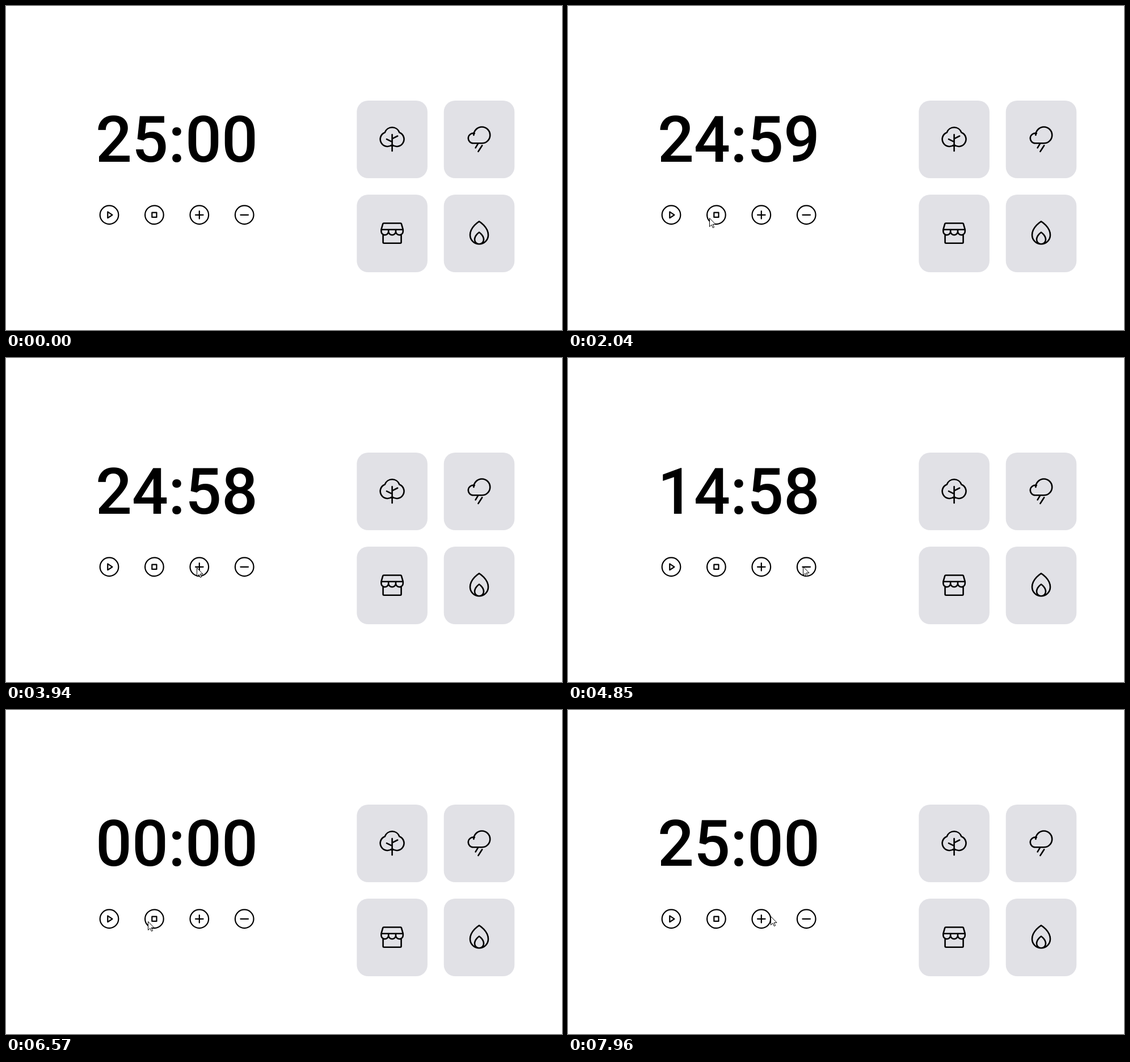
Recreate the animation shown at these times as an HTML page. Size 980 by 572 pixels, loop 8000 ms.

```html
<!DOCTYPE html>
<html lang="en">
<head>
<meta charset="utf-8">
<title>Focus timer</title>
<style>
  html, body { margin: 0; width: 100%; height: 100%; overflow: hidden; background: #fff; }
  svg { display: block; width: 980px; height: 572px; }
  text { font: 500 112.6px Roboto, sans-serif; text-anchor: middle; }
  .tile { fill: #e1e1e6; }
  .icon { fill: none; stroke: #000; stroke-width: 13; stroke-linecap: round; stroke-linejoin: round; }
</style>
</head>
<body>
<svg viewBox="0 0 980 572">
  <g id="scene"></g>
  <text id="clock" x="301" y="275.3"></text>
  <path id="cursor" d="M.5 .5V15.6L4 12.3L6.4 17.6L8.6 16.6L6.2 11.4H11Z" fill="#fff" stroke="#000"/>
</svg>
<script>
const LOOP = 8000;
const scene = document.getElementById('scene');
const clock = document.getElementById('clock');
const cursor = document.getElementById('cursor');

// Icons are drawn on a 256-unit grid centred at (x, y).
const icon = (x, y, scale, d) =>
  `<path class="icon" transform="translate(${x} ${y}) scale(${scale}) translate(-128 -128)" d="${d}"/>`;

const ring = 'M32 128a96 96 0 1 0 192 0a96 96 0 1 0 -192 0Z';
const buttons = [
  'M160 128L112 96V160Z',
  'M104 104H152V152H104Z',
  'M88 128H168M128 88V168',
  'M88 128H168'
];

const tree = 'M64 69A68 68 0 0 1 192 69A64 64 0 1 1 128 178A64 64 0 1 1 64 69Z' +
  'M128 88V232M128 124L176 100M80 128L128 152';
const rain = 'M80 92A72 72 0 1 1 152 164H76A44 44 0 1 1 86.6 77.3M120 164L96 204M154 184L120 237';
const scallop = x => `M${x} 96v16a32 32 0 0 1 -64 0V96`;
const shop = 'M48 139.6V208a8 8 0 0 0 8 8H200a8 8 0 0 0 8 -8V139.6' +
  'M54 40H202a8 8 0 0 1 7.7 5.8L224 96H32L46.3 45.8A8 8 0 0 1 54 40Z' +
  [96, 160, 224].map(scallop).join('');
// Teardrop with its point at (128, top), its bowl centred at y
const drop = (top, y, r) =>
  `M${128 + r} ${y}a${r} ${r} 0 0 1 ${-2 * r} 0C${128 - r} ${y - .6 * (y - top)} 128 ${top} 128 ${top}` +
  `S${128 + r} ${y - .6 * (y - top)} ${128 + r} ${y}Z`;
const fire = drop(24, 144, 80) + drop(120, 184, 40);

scene.innerHTML =
  buttons.map((d, i) => icon(182 + 79.4 * i, 368.8, .17, ring + d)).join('') +
  [tree, rain, shop, fire].map((d, i) => {
    const x = 680.6 + 153.4 * (i % 2), y = 235.5 + 166 * (i >> 1);
    return `<rect class="tile" x="${x - 62.3}" y="${y - 68.5}" width="124.6" height="137" rx="20"/>` +
      icon(x, y - .4, .2, d);
  }).join('');

// Button presses, in ms; each minus press takes ten minutes off.
const PLAY = 1645, PAUSE = 2720, RESET = 7190, MINUS = [4510, 5130, 5890];

function secondsLeft(t) {
  if (t < PLAY || t >= RESET) return 25 * 60;
  const ticks = 1 + Math.floor((Math.min(t, PAUSE) - PLAY) / 1000);
  const cuts = MINUS.filter(m => m <= t).length;
  return Math.max(0, 25 * 60 - ticks - cuts * 600);
}

const pad = n => String(n).padStart(2, '0');

// Pointer stops: time, x, y
const stops = [
  [70, 899, 490], [400, 776, 334], [540, 794, 345], [870, 794, 345],
  [1180, 690, 457], [1500, 170, 373], [1640, 171, 373], [2040, 249, 374],
  [3430, 250, 374], [4400, 414, 367], [6050, 414, 372], [6710, 206, 373],
  [6850, 206, 368], [7750, 386, 365], [7960, 357, 364]
];

function pointer(t) {
  const i = stops.findIndex(s => s[0] > t);
  const [t1, ...b] = stops[i < 0 ? stops.length - 1 : i];
  if (i < 0) return b;
  const [t0, ...a] = stops[i - 1];
  const k = (t - t0) / (t1 - t0);
  return a.map((v, j) => Math.round(v + (b[j] - v) * k));
}

function draw(t) {
  const left = secondsLeft(t);
  clock.textContent = pad(Math.floor(left / 60)) + ':' + pad(left % 60);
  const shown = t >= stops[0][0];
  cursor.style.display = shown ? '' : 'none';
  if (shown) cursor.setAttribute('transform', `translate(${pointer(t)})`);
}

const start = performance.now();
function tick() {
  draw((performance.now() - start) % LOOP);
  requestAnimationFrame(tick);
}
tick();
</script>
</body>
</html>
```
